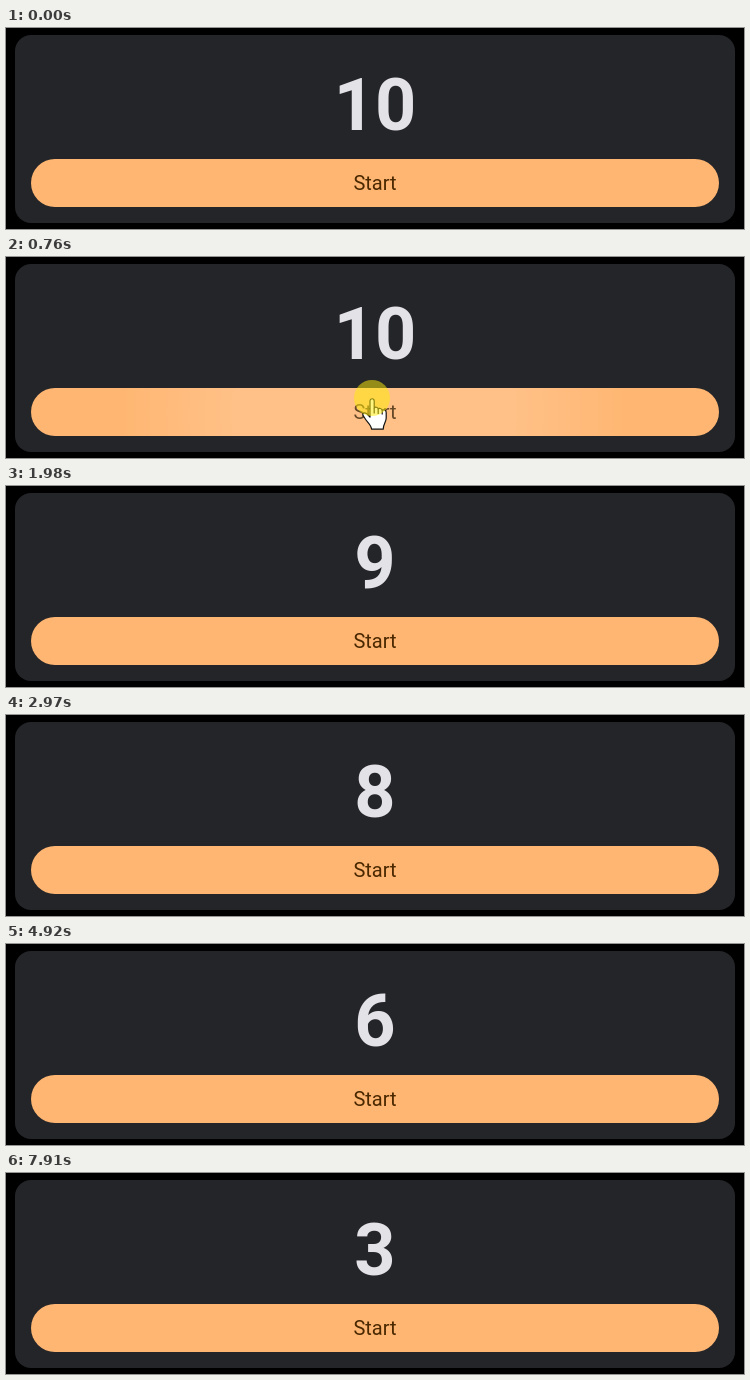
Write an HTML page with a canvas that moves like this. It is 738 by 201 pixels and loops after 8000 ms.

```html
<!DOCTYPE html>
<html lang="en">
<head>
<meta charset="utf-8">
<title>Countdown</title>
<style>
  html, body { margin: 0; width: 738px; height: 201px; overflow: hidden; background: #000; }
  canvas { display: block; }
</style>
</head>
<body>
<canvas id="stage" width="738" height="201"></canvas>
<script>
const ctx = document.getElementById('stage').getContext('2d');
const LOOP = 8000;
const COUNT_AT = [1980, 2970, 3930, 4920, 5910, 6920, 7910];

// The pointer and ripple were sampled at these moments
const TICKS = [0, 60, 130, 210, 290, 370, 440, 510, 570, 710, 760, 830, 900,
  1090, 1150, 1220, 1280, 1340, 1410, 1470, 1530, 1600, 1660];

const HAND = new Path2D(
  'M8 19 V3 C8 0 12.2 0 12.2 3 V10 C12.8 8.6 16 9 16.2 11 ' +
  'C17 9.8 20 10.4 20.2 12.4 C21.4 11.2 24.2 12 24.2 14.4 ' +
  'V20 C24.2 24 21.5 25 21.2 31.2 H9.6 C9.4 27 5 24 3 20.5 ' +
  'L1 17.4 C0 15.2 2.6 14.2 4.4 15.4 Z');
const KNUCKLES = new Path2D('M12.2 10 V15.5 M16.2 11 V16 M20.2 12.4 V16.5');

const clamp = v => Math.min(1, Math.max(0, v));
const progress = (t, from, to) => clamp((t - from) / (to - from));
const mix = (a, b, p) => a + (b - a) * p;

function roundBox(x, y, w, h, r) {
  ctx.beginPath();
  ctx.roundRect(x, y, w, h, r);
}

function label(text, font, y, color) {
  ctx.font = font;
  ctx.fillStyle = color;
  ctx.textAlign = 'center';
  ctx.fillText(text, 369, y);
}

function drawRipple(t) {
  const alpha = 0.15 * (1 - progress(t, 1090, 1470));
  if (t < 710 || alpha === 0) return;
  const radius = t < 760 ? mix(60, 255, progress(t, 710, 760))
                         : mix(255, 720, progress(t, 760, 900));
  const glow = ctx.createRadialGradient(368, 155, 0, 368, 155, radius);
  glow.addColorStop(0, `rgba(255,255,255,${alpha})`);
  glow.addColorStop(0.55, `rgba(255,255,255,${alpha})`);
  glow.addColorStop(1, 'rgba(255,255,255,0)');
  ctx.fillStyle = glow;
  roundBox(25, 131, 688, 48, 24);
  ctx.fill();
}

function handPosition(t) {
  if (t < 440) {
    const k = (1 - progress(t, 60, 440)) ** 2;
    return [351 + 182 * k, 144 + 42 * k];
  }
  if (t < 1090) {
    const p = progress(t, 440, 570);
    return [mix(351, 356, p), mix(144, 141, p)];
  }
  const p = progress(t, 1030, 1660) ** 2;
  return [mix(356, 480, p), mix(141, 202, p)];
}

function drawHand(t) {
  if (t < 60 || t >= 1660) return;
  ctx.save();
  ctx.translate(...handPosition(t));
  ctx.fillStyle = '#fff';
  ctx.strokeStyle = '#111';
  ctx.lineWidth = 1.2;
  ctx.lineJoin = 'round';
  ctx.fill(HAND);
  ctx.stroke(HAND);
  ctx.stroke(KNUCKLES);
  ctx.restore();
}

function drawClick(t) {
  if (t < 710 || t >= 900) return;
  ctx.fillStyle = 'rgba(255,235,10,0.52)';
  ctx.beginPath();
  ctx.arc(366, 141, 18, 0, Math.PI * 2);
  ctx.fill();
}

function draw(time) {
  const t = TICKS.filter(tick => tick <= time).pop();
  ctx.fillStyle = '#000';
  ctx.fillRect(0, 0, 738, 201);

  ctx.fillStyle = '#242529';
  roundBox(9, 7, 720, 188, 16);
  ctx.fill();

  const count = 10 - COUNT_AT.filter(at => at <= time).length;
  label(count, '700 72px Roboto, sans-serif', 102, '#e3e2e6');

  ctx.fillStyle = '#ffb672';
  roundBox(25, 131, 688, 48, 24);
  ctx.fill();
  label('Start', '400 20px Roboto, sans-serif', 162, '#4a2800');

  drawRipple(t);
  drawHand(t);
  drawClick(t);
}

function frame() {
  draw(performance.now() % LOOP);
  requestAnimationFrame(frame);
}
frame();
</script>
</body>
</html>
```
